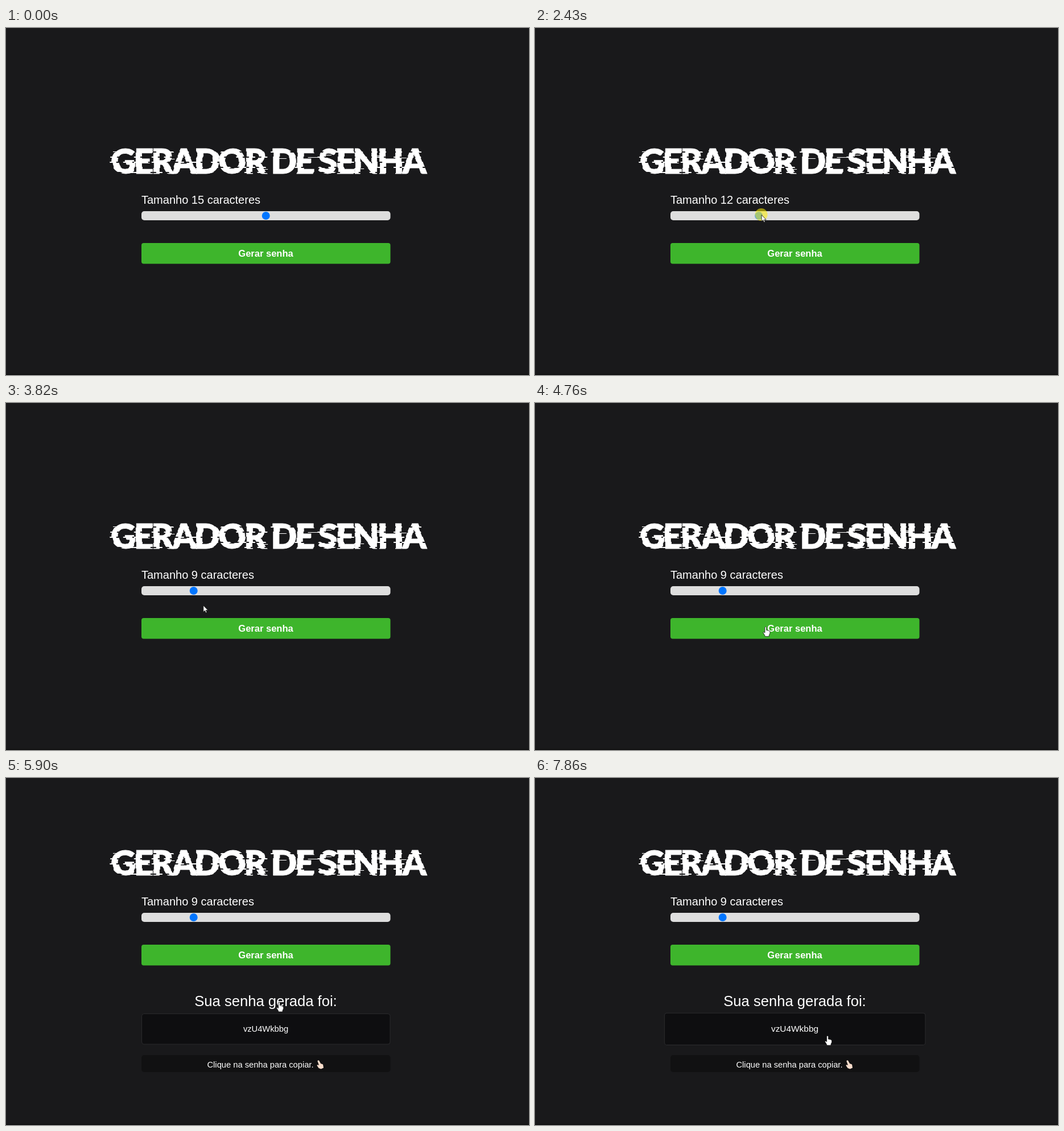
An HTML page that plays this animation: 919 px wide and 610 px high, repeating every 8000 ms.

```html
<!DOCTYPE html>
<html lang="pt">
<head>
<meta charset="utf-8">
<title>Gerador de senha</title>
<style>
html, body { margin: 0; width: 100%; height: 100%; overflow: hidden; background: #19191b; }
svg { display: block; }
text { fill: #fff; font-family: "Liberation Sans", Arial, sans-serif; }
.mid { text-anchor: middle; }
.title { font: 900 60px Lato, Inter, sans-serif; font-kerning: none; letter-spacing: -3.4px; stroke: #fff; stroke-width: .8; }
</style>
</head>
<body>
<svg width="919" height="610" viewBox="0 0 919 610">
  <rect y="608" width="919" height="2" fill="#101011"/>
  <g id="panel">
    <g id="logo"></g>
    <text id="label" x="238" y="309" font-size="20"></text>
    <rect x="238" y="322" width="437.5" height="16" rx="5" fill="#dedede"/>
    <circle id="thumb" cy="330" r="7"/>
    <rect x="238" y="378" width="437.5" height="36.5" rx="4" fill="#3eb52c"/>
    <text class="mid" x="456.5" y="401.5" font-size="16.5" font-weight="700">Gerar senha</text>
  </g>
  <g id="result">
    <text class="mid" x="456.5" y="400.5" font-size="25.6">Sua senha gerada foi:</text>
    <g id="password">
      <rect x="238.5" y="414.5" width="436.5" height="53.5" rx="4" fill="#0e0e10" stroke="#2a2a2c"/>
      <text class="mid" x="456.5" y="446" font-size="14.7">vzU4Wkbbg</text>
    </g>
    <g id="hint">
      <rect x="238" y="487" width="437.5" height="30" rx="5" fill="#111112"/>
      <text x="353.5" y="508.5" font-size="14.7">Clique na senha para copiar.</text>
      <path fill="#f8dccb" d="M547.3 497.5Q548.8 495.5 550.3 497L553 502 557 503.5 558 509.5 553.5 511.5 549.5 510 546.5 505.5Q546.5 504 548 504.3L550 505Z"/>
    </g>
  </g>
  <g id="cursor">
    <circle id="press" cx="-.5" cy="-.5" r="11" fill="#ffee00" opacity=".55"/>
    <path id="arrow" fill="#fff" stroke="#111" stroke-width=".8" d="M0 0V11.5L2.6 9 4.4 13 6.2 12.2 4.5 8.4H8Z"/>
    <path id="hand" fill="#fff" stroke="#111" stroke-width=".8" d="M-1.4 10.5V1.2Q0-1.4 1.4 1.2V6L5 6.6 7.6 8V11.5L6 15V17H-1L-2 14.5-4.5 10.5Q-4.2 8.3-1.4 10.5Z"/>
  </g>
</svg>
<script>
(() => {
  const el = id => document.getElementById(id);
  const show = (id, on) => el(id).style.display = on ? '' : 'none';
  const noise = n => { const s = Math.sin(n) * 43758.5; return s - Math.floor(s); };
  const ease = (t, from, to) => {
    const p = Math.min(1, Math.max(0, (t - from) / (to - from)));
    return p * p * (3 - 2 * p);
  };

  const LOOP = 8000, TICK = 67.2;
  const START = 940, HOVER = 1480, PRESS = 2040, RELEASE = 3680, SUBMIT = 5230, SHOWN = 5370;

  // Title: horizontal slices, each with some letters knocked sideways
  function buildTitle() {
    const word = 'GERADOR DE SENHA';
    let html = '';
    for (let y = 210, b = 0, h; y < 258; y += h, b++) {
      h = b % 2 ? 2 : 7;
      const reach = b % 2 ? 4 : 1;
      const shift = i => {
        const r = noise(i * 12.9 + b * 78.2 + 1);
        return i < 0 ? 0 : r < .35 ? -reach : r > .8 ? reach : 0;
      };
      const dx = [...word].map((c, i) => shift(i) - shift(i - 1)).join(' ');
      html += `<svg y="${y}" width="919" height="${h}" viewBox="0 ${y} 919 ${h}">` +
        `<text class="title" x="185" y="255.5" dx="${dx}">${word}</text></svg>`;
    }
    let lines = '';
    for (let i = 0; i < 13; i++) {
      const x = 184 + i * 41 + noise(i + 3) * 20, y = 216.5 + Math.floor(noise(i + 40) * 36);
      lines += `M${x} ${y}h${8 + noise(i + 80) * 10}`;
    }
    el('logo').innerHTML = html + `<path stroke="#fff" d="${lines}"/>`;
  }

  // Pointer moves: first change, last change, end point
  const moves = [
    [START, 1550, 457, 334], [1680, 1750, 457, 328], [PRESS, 2820, 348, 329],
    [3100, 3230, 330, 329], [RELEASE, 4100, 370, 393], [4760, 4900, 480, 394],
    [6230, 6480, 352, 394], [6550, 6920, 561, 390], [7250, 7500, 540, 496], [7560, 7720, 514, 453]
  ];
  function pointer(t) {
    let x = 870, y = 588;
    for (const [from, to, toX, toY] of moves) {
      const p = ease(t, from - TICK, to);
      x += (toX - x) * p;
      y += (toY - y) * p;
    }
    return [x, y];
  }

  function draw(t) {
    const step = Math.floor((t + 15) / TICK) * TICK;
    const [x, y] = pointer(step);
    const shown = t >= SHOWN;

    const dragX = pointer(Math.min(step, 3600))[0];
    const size = t < PRESS ? 15 : Math.round((dragX - 245) / 21.17 + 5);
    const dragging = t >= PRESS && t < RELEASE;
    const over = t >= HOVER && t < RELEASE + TICK;
    el('label').textContent = `Tamanho ${size} caracteres`;
    el('thumb').setAttribute('cx', 245 + (size - 5) * 21.17);
    el('thumb').setAttribute('fill', dragging ? '#3793ff' : over ? '#005cc8' : '#0075ff');

    el('panel').setAttribute('transform', `translate(0 ${shown ? -85 : 0})`);
    show('result', shown);
    el('hint').setAttribute('opacity', ease(t, SHOWN, 5900));
    const zoom = 1 + .05 * ease(step, 7550, 7860);
    el('password').setAttribute('transform', `translate(456.5 441) scale(${zoom}) translate(-456.5 -441)`);

    const hand = shown || (y > 378 && y < 414);
    show('cursor', t >= START);
    show('press', dragging || (t >= SUBMIT && !shown));
    show('hand', hand);
    show('arrow', !hand);
    el('cursor').setAttribute('transform', `translate(${x} ${y})`);
  }

  buildTitle();
  const begin = performance.now();
  function frame() {
    draw((performance.now() - begin) % LOOP);
    requestAnimationFrame(frame);
  }
  frame();
})();
</script>
</body>
</html>
```
